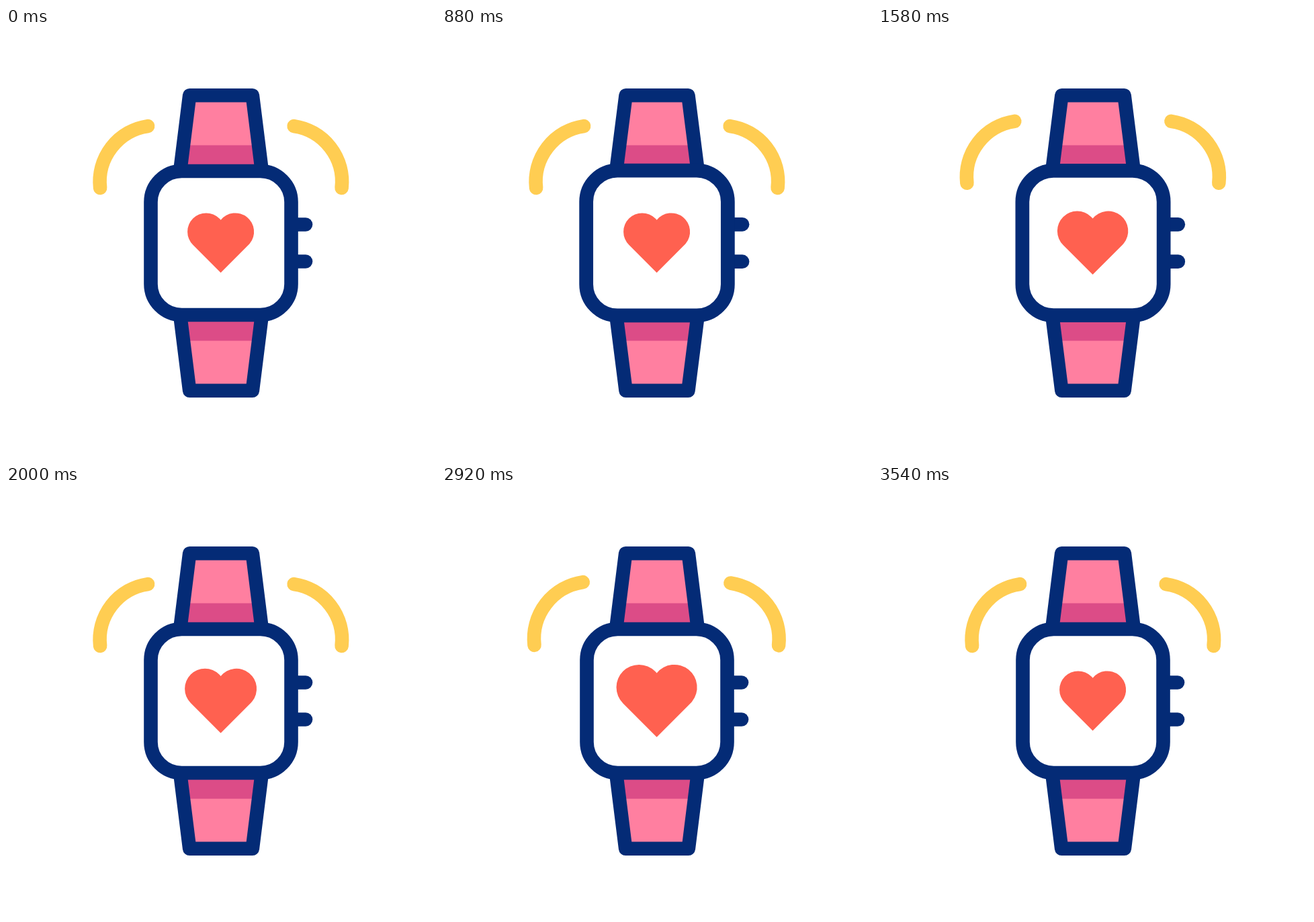
Write an HTML page with a canvas that moves like this. It is 640 px wide and 640 px high and loops after 3600 ms.

```html
<!DOCTYPE html>
<html lang="en">
<head>
<meta charset="utf-8">
<title>Smartwatch pulse</title>
<style>
html, body { margin: 0; width: 100%; height: 100%; overflow: hidden; background: #fff; }
canvas { display: block; width: 640px; height: 640px; }
</style>
</head>
<body>
<canvas id="stage" width="640" height="640"></canvas>
<script>
const ctx = document.getElementById('stage').getContext('2d');
const LOOP = 3600, CENTER = 320, LINE = 20.6;
const NAVY = '#042b76', PINK = '#ff7fa0', ROSE = '#dc4c87';
const RED = '#ff6150', YELLOW = '#ffcd52';
const rad = degrees => degrees * Math.PI / 180;

// Eases from 0 at `start` to 1 at `peak` and back to 0 at `end`.
function beat(t, start, peak, end) {
  if (t <= start || t >= end) return 0;
  const u = t < peak ? (t - start) / (peak - start) : (end - t) / (end - peak);
  return Math.sin(u * Math.PI / 2) ** 2;
}

const throb = t => beat(t, 140, 450, 767) + beat(t, 1080, 1400, 1654)
  + beat(t, 1820, 2380, 2700) + beat(t, 2700, 3080, 3540);
const squeeze = t => beat(t, 140, 580, 1000) + beat(t, 1200, 1400, 1640)
  + beat(t, 2360, 2640, 2900) + beat(t, 2940, 3220, 3540);
const slide = t => beat(t, 140, 570, 880) + beat(t, 1240, 1420, 1740);
const swing = t => beat(t, 880, 1180, 1440);
const spread = t => beat(t, 2250, 2460, 3020) + beat(t, 3020, 3200, 3540);

function scaled(x, y, scale, draw) {
  ctx.save();
  ctx.translate(x, y);
  ctx.scale(scale, scale);
  ctx.translate(-x, -y);
  draw();
  ctx.restore();
}

function stroke(color) {
  ctx.strokeStyle = color;
  ctx.lineWidth = LINE;
  ctx.stroke();
}

// The arc grows around its own middle and swings about a point below it.
function arc(t, spreading) {
  const midX = 175.5, midY = 192, size = 1 + 0.25 * spreading;
  ctx.save();
  ctx.translate(171, CENTER);
  ctx.rotate(rad(-6 * swing(t)));
  ctx.translate(midX - 171 - 15.6 * slide(t) - 26 * spreading,
    midY - CENTER - 14.6 * slide(t) - 27 * spreading);
  ctx.beginPath();
  ctx.arc(47.6 * size, 36.7 * size, 83.5 * size, rad(173.6), rad(261.7));
  stroke(YELLOW);
  ctx.restore();
}

function arcs(t) {
  const lead = 25;
  arc(t, spread(t));
  ctx.save();
  ctx.translate(2 * CENTER - 0.3, 0);
  ctx.scale(-1, 1);
  arc(t, spread(t + lead));
  ctx.restore();
}

function band(inset) {
  ctx.beginPath();
  ctx.moveTo(253, 262);
  ctx.lineTo(273.2 + inset, 100.3);
  ctx.lineTo(366.8 - inset, 100.3);
  ctx.lineTo(387, 262);
  ctx.closePath();
  ctx.fillStyle = PINK;
  ctx.fill();
  ctx.save();
  ctx.clip();
  ctx.fillStyle = ROSE;
  ctx.fillRect(240, 174.5, 160, 90);
  ctx.restore();
  stroke(NAVY);
}

function bands(inset) {
  band(inset);
  ctx.save();
  ctx.translate(0, 2 * CENTER);
  ctx.scale(1, -1);
  band(inset);
  ctx.restore();
}

function body() {
  for (const y of [292.5, 347.5]) {
    ctx.beginPath();
    ctx.moveTo(425, y);
    ctx.lineTo(446, y);
    stroke(NAVY);
  }
  ctx.beginPath();
  ctx.roundRect(215.5, 213, 209, 214, 46);
  ctx.fillStyle = '#fff';
  ctx.fill();
  stroke(NAVY);
}

function heart() {
  const x = 319.6, y = 303.2, half = 21.7, r = 27.8;
  const notch = Math.asin(half / r) - Math.PI / 2;
  ctx.beginPath();
  ctx.arc(x - half, y, r, Math.PI * 0.75, notch);
  ctx.arc(x + half, y, r, Math.PI - notch, Math.PI * 0.25);
  ctx.lineTo(x, y + half + r * Math.SQRT2);
  ctx.closePath();
  ctx.fillStyle = RED;
  ctx.fill();
}

function render(t) {
  ctx.fillStyle = '#fff';
  ctx.fillRect(0, 0, 640, 640);
  ctx.lineCap = ctx.lineJoin = 'round';
  arcs(t);
  bands(10.7 * squeeze(t) ** 2);
  scaled(CENTER, CENTER, 1 + 0.043 * squeeze(t) - 0.013 * swing(t), body);
  scaled(319.7, CENTER, 1 + 0.34 * throb(t), heart);
}

const start = performance.now();
function tick() {
  render((performance.now() - start) % LOOP);
  requestAnimationFrame(tick);
}
tick();
</script>
</body>
</html>
```
